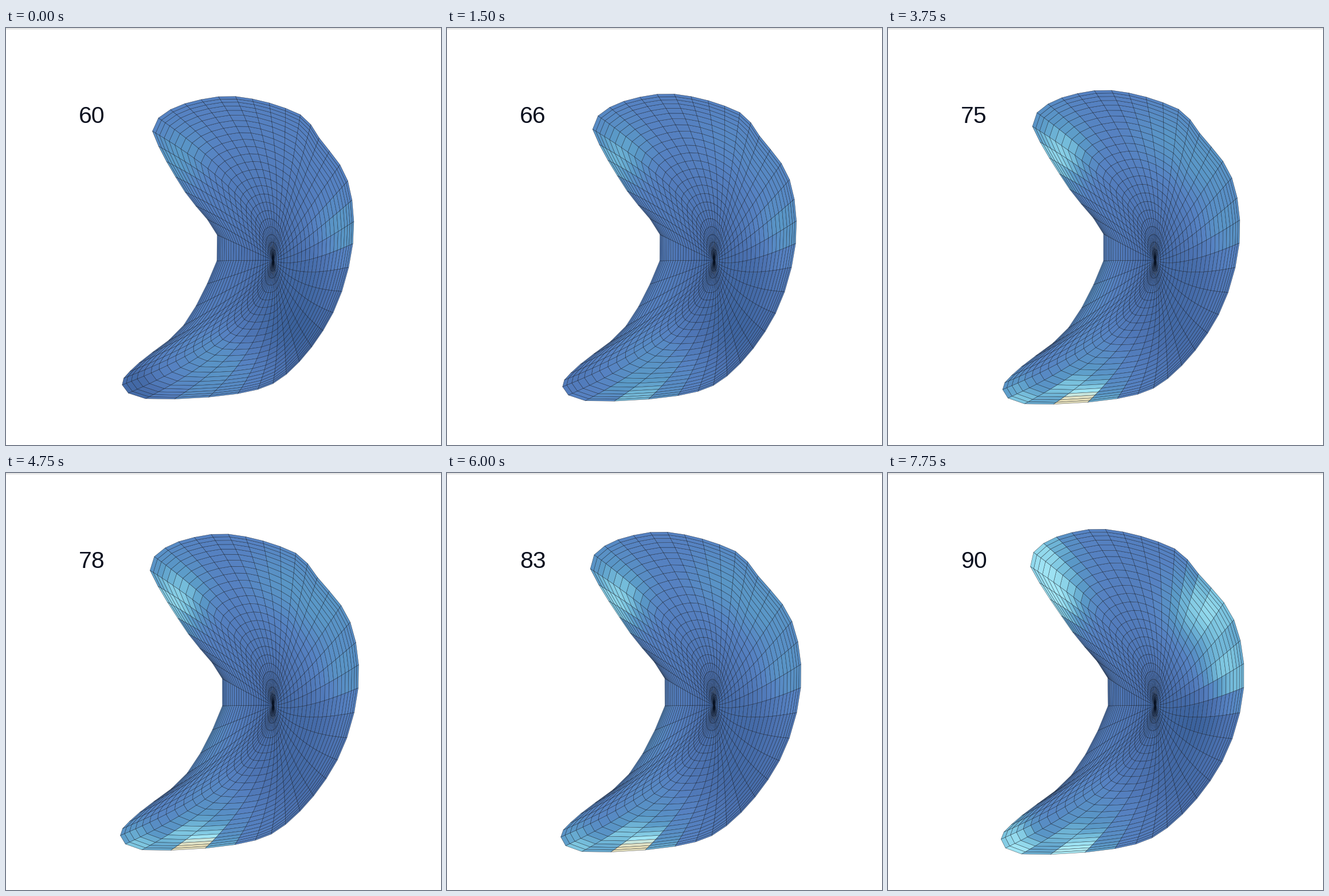
Write a matplotlib script that moves like this. It is 759 px wide and 729 px high and loops after 8000 ms.

```python
import matplotlib.pyplot as plt
import numpy as np
from matplotlib.animation import FuncAnimation
from matplotlib.collections import PolyCollection
from matplotlib.colors import LinearSegmentedColormap

W, H, DPI = 759, 729, 64
PX = 72 / DPI  # points per pixel
SPOKES, RINGS = 50, 25
POLE = np.array([466, 406])
CORE = np.array([75, 270])  # half axes of the ellipse the rings start from
AGES = [*range(60, 74), 73, *range(75, 78), 77, *range(78, 91)]

# Key points of the rim at age 75: spoke, x, y
RIM_KEYS = [(0, 252, 172), (1, 260, 148), (3, 303, 122), (6, 390, 109),
            (10, 507, 142), (12, 544, 184), (15, 600, 262), (18, 613, 376),
            (21, 577, 501), (25, 488, 613), (28, 400, 648), (31, 238, 657),
            (33, 200, 632), (36, 233, 592), (39, 315, 524), (42, 376, 407),
            (43, 376, 360), (46, 317, 282)]

# Soft spots of the surface value: x, y, radius, height at ages 60, 75, 90
SPOTS = [(295, 225, 55, .18, .38, .42), (270, 150, 50, 0, .06, .35),
         (555, 245, 65, .02, .17, .42), (590, 350, 50, .20, .16, .35),
         (510, 530, 75, -.24, -.15, -.15), (540, 430, 50, -.1, -.1, -.2),
         (330, 660, 45, .05, .60, .48), (235, 655, 35, -.1, .3, .3),
         (370, 590, 60, .15, .12, .12), (215, 620, 45, -.2, .05, .25),
         (345, 440, 70, 0, .15, .03), (480, 190, 60, .02, .14, 0)]

CMAP = LinearSegmentedColormap.from_list("surface", [
    (0, "#385f99"), (.2, "#4c72b1"), (.35, "#5682c2"), (.5, "#5a99c7"),
    (.65, "#7ac3de"), (.8, "#a6eaf8"), (.9, "#dee3cb"), (1, "#fdd68c")])


def closed_curve(keys):
    """Smooth closed curve through (spoke, x, y) keys, one point per spoke."""
    keys = np.array(keys, float)
    turn = np.array([SPOKES, 0, 0])
    keys = np.vstack([keys[-1] - turn, keys, keys[:2] + turn])
    k, p = keys[:, 0], keys[:, 1:]
    slope = (p[2:] - p[:-2]) / (k[2:] - k[:-2])[:, None]
    j = np.arange(SPOKES)
    i = np.searchsorted(k, j, side="right") - 1
    step = (k[i + 1] - k[i])[:, None]
    t = (j - k[i])[:, None] / step
    mix = t * t * (3 - 2 * t)
    return (p[i] + (p[i + 1] - p[i]) * mix
            + step * t * (1 - t) * ((1 - t) * slope[i - 1] - t * slope[i]))


RIM = closed_curve(RIM_KEYS) - POLE
angle = 2 * np.pi * (np.arange(SPOKES) - 17) / SPOKES
START = CORE * np.stack([np.cos(angle), np.sin(angle)], 1)


def rim(age):
    """The crescent lengthens and bends more as age rises."""
    t = (age - 75) / 15
    x, y = RIM.T
    return np.stack([x + t * (8 - 2.1e-4 * y ** 2), y * (1 + .036 * t)], 1)


def faces(age):
    s = np.linspace(0, 1, RINGS + 1)[:, None, None]
    u = (np.sin(1.38 * s) / np.sin(1.38)) ** 1.2
    v = POLE + START * u + (rim(age) - START) * u ** 2
    n = np.roll(v, -1, axis=1)
    return np.stack([v[:-1], v[1:], n[1:], n[:-1]], 2).reshape(-1, 4, 2)


centres = faces(75).mean(axis=1)
depth = np.hypot(*((centres - POLE) * [1.6, 1]).T)
base = .1 + .25 * (1 - np.exp(-depth / 120))


def shade(age):
    stage = np.interp(age, [60, 75, 83, 90], [0, 1, 1, 2])
    level = base.copy()
    for x, y, r, *heights in SPOTS:
        d2 = ((centres - [x, y]) ** 2).sum(axis=1)
        level += np.interp(stage, [0, 1, 2], heights) * np.exp(-d2 / r ** 2)
    return CMAP(np.clip(level, 0, 1))


fig = plt.figure(figsize=(W / DPI, H / DPI), dpi=DPI, facecolor="white")
ax = fig.add_axes([0, 0, 1, 1])
ax.set(xlim=(0, W), ylim=(H, 0))
ax.axis("off")
ax.plot([0, W], [.5, .5], color="#c8c8c8", lw=PX)
mesh = PolyCollection(faces(60), edgecolors=(0, .02, .06, .62),
                      linewidths=.55 * PX)
ax.add_collection(mesh, autolim=False)
label = ax.text(127, 165.5, "", family="Liberation Sans", fontsize=41 * PX,
                color="#0a0f1e", va="baseline")


def update(k):
    age = AGES[k]
    mesh.set_verts(faces(age))
    mesh.set_facecolor(shade(age))
    label.set_text(str(age))
    return mesh, label


anim = FuncAnimation(fig, update, frames=len(AGES), interval=250,
                     repeat=True, repeat_delay=0)
plt.show()
```
